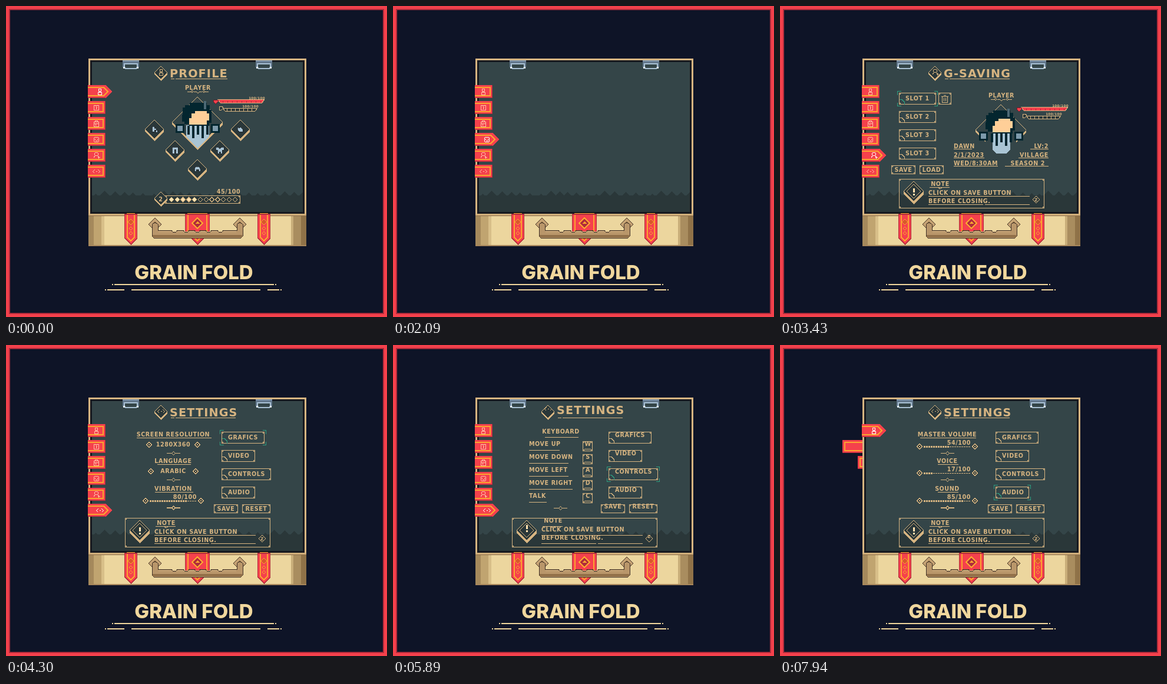
These frames come from a looping animation (647x527 px, 8000 ms). An HTML page:

```html
<!DOCTYPE html>
<html lang="en">
<head>
<meta charset="utf-8">
<title>Game menu in a case</title>
<style>
html, body { margin: 0; width: 100%; height: 100%; overflow: hidden; background: #0e1427; }
svg { display: block; width: 647px; height: 527px; shape-rendering: crispEdges; }
text { font-family: "DejaVu Sans", sans-serif; font-weight: 700; fill: #d6b481; letter-spacing: .06em; }
</style>
</head>
<body>
<svg id="stage" viewBox="0 0 647 527" xmlns="http://www.w3.org/2000/svg"></svg>
<script>
const TAN = '#d6b481', CREAM = '#ffe3b0', PANEL = '#344548', DARK = '#2a3739',
  INK = '#17191f', RED = '#f5414c', WINE = '#b02c3b', GOLD = '#fba530',
  STEEL = '#a9c4d4', BROWN = '#a8763f', TEAL = '#2f9e80', NAVY = '#03262f';

// Drawing helpers
const rect = (x, y, w, h, fill) => `<rect x="${x}" y="${y}" width="${w}" height="${h}" fill="${fill}"/>`;
const path = (d, fill = 'none', stroke = 'none', w = 1) =>
  `<path d="${d}" fill="${fill}" stroke="${stroke}" stroke-width="${w}"/>`;
const line = (x1, x2, y, c = TAN) => rect(x1, y, x2 - x1, 1, c);
const move = (x, y, body) => `<g transform="translate(${x} ${y})">${body}</g>`;
const dia = (x, y, r, fill = 'none', stroke = TAN, w = 1) =>
  path(`M${x - r} ${y}L${x} ${y - r}L${x + r} ${y}L${x} ${y + r}Z`, fill, stroke, w);
const gem = (x, y, r, fill = PANEL, t = 4) =>
  path(`M${x - r} ${y}L${x} ${y + r}L${x + r} ${y}v${t}L${x} ${y + r + t}L${x - r} ${y + t}Z`, TAN) + dia(x, y, r, fill);
const text = (x, y, s, anchor = 'start', size = 9.6) =>
  `<text x="${x}" y="${y + size * .365}" font-size="${size}" text-anchor="${anchor}">${s}</text>`;
const times = (n, f) => Array.from({ length: n }, (_, i) => f(i)).join('');

function frame(x, y, w, h, c = TAN) {
  const dot = (a, b) => rect(a, b, 3, 3, c) + rect(a + 1, b + 1, 1, 1, PANEL);
  return `<rect x="${x + .5}" y="${y + .5}" width="${w - 1}" height="${h - 1}" fill="none" stroke="${c}"/>` +
    dot(x, y) + dot(x + w - 3, y) + dot(x, y + h - 3) + dot(x + w - 3, y + h - 3);
}
// Selection marks around a box
function corners(x, y, w, h) {
  const l = x - 2.5, t = y - 2.5, r = x + w + 2.5, b = y + h + 2.5;
  return path(`M${l} ${t + 6}V${t}h6M${r - 6} ${t}H${r}v6M${r} ${b - 6}V${b}h-6M${l + 6} ${b}H${l}v-6`, 'none', TEAL);
}

// Small symbols centred on 0,0
const tabIcons = [
  'M-2 -5h4v4h-4ZM-1 -1v2M1 -1v2M-3 1h6v4h-6Z',
  'M-4 -4h2l2 1l2 -1h2v8h-8ZM-1 0h2M0 -2v4',
  'M-2 -3v-2h4v2M-4 -3h8v8h-8ZM-4 0h8M-1 0v3',
  'M-3 -4h6l1 1v6l-1 1h-6l-1 -1v-6ZM-2 -2v2M2 -2v2M-2 2h4',
  'M-2 -5h4l1 1v3l-1 1h-4l-1 -1v-3ZM-2 0l-3 4M2 0l2 3M2 3h4M4 1v4',
  'M-3 -3l-3 3l3 3M3 -3l3 3l-3 3M-1 0h2'
];
const items = {
  hat: 'M-5 4V0l2 -4h6l2 4v4h-3V1h-4v3Z',
  shirt: 'M-7 -5h4l3 3l3 -3h4v5h-3v6h-3v-3h-2v3h-3V0h-3Z',
  pants: 'M-5 -5h10V6h-4V-1h-2V6h-4Z',
  glove: 'M-5 -4l3 2l2 -2l4 4v4h-6l-3 -3Z',
  boots: 'M-4 -5h4v3h3v3h-3v3h-4ZM2 1h3v4h-3Z'
};
const item = (name, x, y, fill = STEEL) => move(x, y, path(items[name], fill, INK, .7));
const tabIcon = (i, x, y, c) => move(x + .5, y + .5, path(tabIcons[i], 'none', c));

// Pages: fixed shapes plus lettering that drops into place
const pages = [];
function page(title, icon, build) {
  const p = { fixed: '', drop: '' };
  const put = s => p.fixed += s;
  const say = (...a) => p.drop += text(...a);
  put(gem(263, 113, 11, DARK, 3));
  p.drop += tabIcon(icon, 263, 112, TAN);
  say(278, 114, title, 'start', 19.2);
  const end = 278 + title.length * 14;
  put(line(280, 286, 123) + line(288, end, 123));
  build(put, say, p);
  pages.push(p);
}
function heading(put, say, s, x, y) {
  const half = s.length * 3.8;
  say(x, y, s, 'middle');
  put(line(x - half + 3, x + half, y + 6));
}
function note(put, say, p, head, a, b) {
  put(frame(202, 293, 247, 50) + gem(227, 314, 17, DARK, 5) + dia(227, 314, 12) + dia(435, 328, 6, DARK));
  put(line(254, 288, 307) + path('M268 307l4 3l4 -3', 'none', TAN));
  put(line(252, 424, 322) + line(252, 345, 336) + line(348, 424, 336));
  say(272, 301, head, 'middle');
  say(252, 316, a);
  say(252, 330, b);
  say(435, 328, 'Z', 'middle', 7);
  if (head === 'HAT') put(path('M220 311v3h4v-3M230 311v3h4v-3M221 318l3 3h6l3 -3', 'none', CREAM, 2));
  else p.drop += rect(226, 309, 3, 7, CREAM) + rect(226, 318, 3, 3, CREAM);
}
function button(put, say, s, x, y, w, on) {
  put(frame(x, y, w, 20) + path(`M${x + 1} ${y + 11.5}h4l4 4v4`, 'none', on ? TEAL : TAN));
  if (on) put(corners(x, y, w, 20));
  say(x + 11, y + 9, s);
}
function smallButton(put, say, s, x, w) {
  put(frame(x, 270, w, 15));
  say(x + w / 2, 277, s, 'middle');
}
const divider = y => line(273, 281, y) + dia(284.5, y + .5, 3) + line(288, 296, y);
const knob = (x, y) => dia(x, y, 4.5, DARK) + dia(x, y, 1, TAN);
function slot(x, y) {
  return frame(x, y, 32, 33) + path(`M${x + 1} ${y + 23.5}h3l4 4v5`, 'none', TAN) + rect(x + 3, y + 28, 3, 1, TAN);
}

// The figure covers the lower edge of its diamond when open is set
function portrait(open) {
  let s = open ? path('M282 197l17 17v4l-17 -17ZM368 197l-17 17v4l17 -17Z', TAN) + path('M282 197L325 154L368 197', 'none', TAN)
    : gem(325, 197, 43, PANEL, 4);
  s += path(open ? 'M311 202H341V230L335 237H317L311 230Z' : 'M306 202H345V222L325 241L306 222Z', STEEL);
  s += times(5, i => rect(308 + i * 8, 203, 4, i % 2 ? 21 : 15, NAVY));
  s += path('M300 172h4v-4h8v-4h29v4h5v8h3v22h-4v5h-34v-3h-8v-4h-4Z', NAVY);
  s += path('M311 190h4v-8h6v-4h20v4h4v12h-4v7h-30Z', '#ffcf98');
  s += rect(336, 161, 4, 14, '#4d6975');
  s += rect(288, 200, 15, 15, NAVY) + rect(291, 203, 9, 9, '#7d9aab');
  s += rect(348, 200, 15, 15, NAVY) + rect(351, 203, 9, 9, '#7d9aab');
  s += path('M359 158h80l-4 6h-71Z', RED, TAN) + times(9, i => rect(368 + i * 8, 161, 1, 3, WINE));
  s += path('M352 159h3l1 1l1 -1h3v3l-4 4l-4 -4Z', RED, '#7d1628');
  s += path('M368 173h59l-4 5h-51Z', DARK, TAN) + times(7, i => rect(375 + i * 7, 174, 1, 4, TAN));
  s += path('M362 170h5l2 3l-3 3h-4Z', DARK, TAN);
  return s;
}
const stats = (say, x, y) => {
  say(426 + x, 156 + y, '100/100', 'middle', 5.6);
  say(415 + x, 170 + y, '100/100', 'middle', 5.6);
};
const ornament = (x, y) => line(x - 18, x - 12, y) + dia(x - 10, y, 2) + line(x - 7, x - 3, y) +
  path(`M${x - 3} ${y}l3 3l3 -3`, 'none', TAN) + line(x + 3, x + 7, y) + dia(x + 10, y, 2) + line(x + 12, x + 18, y);

page('PROFILE', 0, (put, say) => {
  say(326, 138, 'PLAYER', 'middle');
  put(ornament(326, 145) + portrait(false));
  stats(say, 0, 0);
  [['boots', 252, 209], ['pants', 287, 244], ['hat', 325, 276], ['shirt', 363, 244], ['glove', 398, 209]]
    .forEach(([n, x, y]) => put(gem(x, y, 16, DARK) + item(n, x, y)));
  put(frame(270, 321, 128, 14) + gem(263, 326, 11, DARK, 3));
  put(times(12, i => dia(281 + i * 9.8, 328, 4, i < 5 ? CREAM : 'none')));
  say(263, 327, '2', 'middle');
  say(378, 314, '45/100', 'middle');
});

page('EQUIPMENT', 1, (put, say, p) => {
  Object.entries({ PANTS: 'pants', SHIRT: 'shirt', HAT: 'hat', GLOVE: 'glove', BOOTS: 'boots' }).forEach(([s, n], i) => {
    const x = 229 + i * 48, on = n === 'hat', half = s.length * 3.5;
    say(x + 1, 143, s, 'middle');
    put(line(x - half, x + half, 149) + path(`M${x - 3} 149l3 3l3 -3`, 'none', TAN));
    put(gem(x, 172, 17, on ? CREAM : PANEL) + item(n, x, 172, on ? CREAM : DARK));
  });
  const kinds = ['hat', 'shirt', 'pants', 'glove', 'boots', 'hat', 'shirt', 'pants', 'glove', 'boots'];
  put(times(12, i => slot(202 + i % 6 * 43, i < 6 ? 204 : 249)));
  kinds.forEach((n, i) => put(item(n, 218 + i % 6 * 43, i < 6 ? 221 : 266, i < 5 ? STEEL : BROWN)));
  put(corners(202, 204, 32, 33));
  note(put, say, p, 'HAT', 'BASIC QUALITY HAT.', 'GOOD FOR BEGINNERS.');
});

page('INVENTORY', 2, (put, say, p) => {
  put(times(18, i => slot(202 + i % 6 * 43, 159 + 45 * Math.floor(i / 6))));
  Object.keys(items).forEach((n, i) => put(item(n, 218 + i * 43, 176, BROWN)));
  put(corners(202, 159, 32, 33) + knob(191, 221) + knob(456, 221));
  heading(put, say, 'ITEMS', 325, 143);
  note(put, say, p, 'NOTE', 'BASIC QUALITY ITEM.', 'GOOD FOR BEGINNERS.');
});

page('SOCIAL', 3, (put, say, p) => {
  ['PLAYER', 'FARMER', 'BAKER', 'MINER', 'FISHER', 'SMITH'].forEach((s, i) => {
    const x = i % 2 ? 341 : 193, y = 138 + 50 * Math.floor(i / 2);
    put(frame(x, y, 135, 42) + gem(x + 24, y + 19, 15, DARK) + tabIcon(3, x + 24, y + 19, TAN));
    put(times(6, k => dia(x + 54 + k * 12, y + 28, 4, k < 5 - i % 3 ? RED : 'none')));
    say(x + 49, y + 13, s);
  });
  note(put, say, p, 'NOTE', 'TALK TO THE VILLAGERS', 'TO MAKE FRIENDS.');
});

const closing = ['NOTE', 'CLICK ON SAVE BUTTON', 'BEFORE CLOSING.'];
page('G-SAVING', 4, (put, say, p) => {
  ['SLOT 1', 'SLOT 2', 'SLOT 3', 'SLOT 3'].forEach((s, i) => button(put, say, s, 202, 147 + i * 31, 63, !i));
  put(frame(269, 147, 22, 20) + path('M274 153.5h12M278 151.5h4M275.5 154v9h9v-9M278.5 156v5M281.5 156v5', 'none', TAN));
  smallButton(put, say, 'SAVE', 189, 41);
  smallButton(put, say, 'LOAD', 237, 41);
  say(376, 151, 'PLAYER', 'middle');
  put(ornament(376, 158) + move(50, 13, portrait(true)));
  stats(say, 50, 13);
  [['DAWN', 'LV:2', 326, 425], ['2/1/2023', 'VILLAGE', 347, 405], ['WED/8:30AM', 'SEASON 2', 370, 382]].forEach(([a, b, l, r], i) => {
    const y = Math.round(237 + i * 14.7);
    say(295, y, a);
    say(i === 2 ? 450 : 456, y, b, 'end');
    put(line(295, l, y + 5) + line(r, 456, y + 5));
  });
  note(put, say, p, ...closing);
});

const modes = ['GRAFICS', 'VIDEO', 'CONTROLS', 'AUDIO'], modeWidths = [73, 57, 84, 57];
function settings(mode, build) {
  page('SETTINGS', 5, (put, say, p) => {
    modes.forEach((s, i) => button(put, say, s, 366, 147 + i * 31, modeWidths[i], i === mode));
    smallButton(put, say, 'SAVE', 353, 41);
    smallButton(put, say, 'RESET', 401, 48);
    put(divider(276));
    note(put, say, p, ...closing);
    build(put, say);
  });
}
function choice(put, say, name, value, y, half) {
  heading(put, say, name, 284, y);
  say(284, y + 17.5, value, 'middle');
  put(knob(284 - half, y + 18) + knob(284 + half, y + 18) + divider(y + 32));
}
function slider(put, say, name, value, y) {
  heading(put, say, name, 284, y);
  say(324, y + 14, value + '/100', 'end');
  put(knob(237, y + 21) + knob(331, y + 21) + divider(y + 32));
  put(times(20, i => i * 5 < value ? rect(244 + i * 4, y + 20, 3, 3, TAN) : rect(244 + i * 4, y + 21, 3, 1, TAN)));
}
settings(0, (put, say) => {
  choice(put, say, 'SCREEN RESOLUTION', '1280X360', 151, 41);
  choice(put, say, 'LANGUAGE', 'ARABIC', 196, 38);
  slider(put, say, 'VIBRATION', 80, 243);
});
settings(1, (put, say) => {
  choice(put, say, 'SCREEN MODE', 'WINDOW', 151, 41);
  slider(put, say, 'BRIGHTNESS', 70, 196);
  slider(put, say, 'CONTRAST', 50, 243);
});
settings(2, (put, say) => {
  heading(put, say, 'KEYBOARD', 285, 150);
  ['MOVE UP', 'MOVE DOWN', 'MOVE LEFT', 'MOVE RIGHT', 'TALK'].forEach((s, i) => {
    const y = 171 + i * 22;
    say(231, y, s);
    say(331, y, 'WSADC'[i], 'middle');
    put(line(231, 231 + s.length * 7.4, y + 7) + frame(322, y - 8, 17, 17) + line(325, 336, y + 5));
  });
});
settings(3, (put, say) => {
  slider(put, say, 'MASTER VOLUME', 54, 151);
  slider(put, say, 'VOICE', 17, 196);
  slider(put, say, 'SOUND', 85, 243);
});

// Case
function ribbon(x, half) {
  const shape = (h, tip) => `M${x - h} 352V${tip - h}L${x} ${tip}L${x + h} ${tip - h}V352Z`;
  return path(shape(half, 405), WINE) + path(shape(half - 1, 403), RED) +
    path(shape(half - 5, 398), 'none', GOLD, 2) + rect(x - half, 352, half * 2, 2, WINE);
}
function clip(x) {
  return rect(x, 92, 28, 12, '#62778c') + rect(x, 92, 28, 2, '#8499ad') +
    path(`M${x + 3} 98h22v6l-2 2h-18l-2 -2Z`, PANEL, '#a8c0d3', 2) + rect(x + 1, 103, 3, 3, '#e6f3fa') + rect(x + 24, 103, 3, 3, '#e6f3fa');
}
function lid() {
  let hills = 'M146 349V321';
  for (let x = 146, i = 0; x < 504; i++) {
    const w = 12 + i * 7 % 9, h = 3 + i * 5 % 6;
    hills += `L${x + w / 2 - h} 321L${x + w / 2} ${321 - h}L${x + w / 2 + h} 321L${x + w} 321`;
    x += w;
  }
  return rect(140, 89, 370, 266, TAN) + rect(143, 92, 364, 260, INK) + rect(146, 95, 358, 254, PANEL) +
    `<svg x="146" y="300" width="358" height="49" viewBox="146 300 358 49">${path(hills + 'V349Z', DARK)}</svg>` +
    clip(198) + clip(424);
}
function base() {
  const side = (x, w, c) => rect(x, 356, w, 49, c);
  let s = rect(140, 352, 370, 55, '#a8875c') + rect(140, 352, 370, 3, '#d1af7b') + rect(140, 355, 370, 1, '#8d6e4a') + rect(140, 356, 370, 49, '#ecd69e');
  s += side(140, 9, '#a5895c') + side(149, 13, '#c0a470') + side(162, 5, '#d8bf89');
  s += side(484, 4, '#c9ae79') + side(488, 13, '#a98d5f') + side(501, 9, '#8f7248');
  s += ribbon(212, 11) + ribbon(438, 11) + ribbon(325, 21);
  [212, 438].forEach(x => s += dia(x, 366, 5, '#d9562d', GOLD) + dia(x, 377, 3, RED, GOLD) + dia(x, 385, 3, RED, GOLD));
  s += dia(325, 368, 9, WINE, GOLD, 2) + path('M321 369l4 -4l4 4Z', GOLD);
  [253, 397].forEach(x => s += dia(x, 370, 11, '#c4a173', '#4a3829') + dia(x, 370, 6, '#8c6c47'));
  let top = 'M248 370q5 -5 10 0V380H282';
  [286, 306, 325, 344, 364].forEach(x => top += `H${x - 5}l2 3h6l2 -3`);
  s += path(top + 'H392V370q5 -5 10 0V390l-3 3H251l-3 -3Z', '#b9966a', '#3f3026');
  return s + rect(249, 388, 152, 4, '#916f48') + rect(259, 382, 132, 1, '#d0b082');
}

// Tabs
function tab(i, on) {
  const y = 145 + i * 27;
  const body = on ? `M139 ${y - 11}h30l11 11l-11 11h-30Z` : `M139 ${y - 11}h30v22h-30Z`;
  const trim = on ? `M139 ${y - 7}h27l7 7l-7 7h-27` : `M139 ${y - 7}h26v14h-26`;
  return path(body, RED) + rect(139, y + 10, 30, 1, WINE) + (on ? '' : rect(168, y - 11, 1, 22, WINE)) +
    path(trim, 'none', GOLD, 2) + tabIcon(i, on ? 159 : 153, y, on ? '#fff' : '#ffc0a8');
}
const backTab = i => rect(0, 134 + i * 27, 45, 22, RED) + rect(0, 155 + i * 27, 45, 1, WINE) +
  path(`M45 ${138 + i * 27}H4v14H45`, 'none', GOLD, 2);

function bottomTitle() {
  const c = '#f0d79d';
  return `<text x="319" y="463" font-size="33" text-anchor="middle" style="font-family:Inter,sans-serif;font-weight:800;letter-spacing:0;fill:${c}">GRAIN FOLD</text>` +
    rect(184, 471, 271, 2, c) + rect(180, 471, 2, 2, c) + rect(457, 471, 2, 2, c) +
    rect(213, 480, 219, 2, c) + rect(172, 480, 29, 2, c) + rect(444, 480, 20, 2, c) + rect(168, 480, 2, 2, c) + rect(466, 480, 2, 2, c);
}

const stage = document.getElementById('stage');
stage.innerHTML = rect(0, 0, 647, 527, RED) + rect(5, 5, 637, 517, WINE) + rect(7, 7, 633, 513, '#0e1427') +
  times(6, i => `<g class="back">${backTab(i)}</g>`) + lid() + base() +
  pages.map(p => `<g class="page">${p.fixed}<g class="drop">${p.drop}</g></g>`).join('') +
  times(6, i => `<g class="tab">${tab(i, false)}</g><g class="picked">${tab(i, true)}</g>`) + bottomTitle();

const all = c => [...stage.querySelectorAll('.' + c)];
const pageEls = all('page'), drops = all('drop'), tabs = all('tab'), picked = all('picked'), backs = all('back');
const show = (el, on) => el.style.display = on ? '' : 'none';
const shift = (el, x, y) => el.setAttribute('transform', `translate(${x} ${y})`);

const LOOP = 8000, FIRST = 350, PERIOD = 870, BLANK = 200;
const DESELECT = 6940, RETRACT = 7340;

function update(t) {
  const n = t < FIRST ? 0 : Math.min(8, Math.floor((t - FIRST) / PERIOD) + 1);
  const since = n ? t - FIRST - (n - 1) * PERIOD - BLANK : LOOP;
  const step = Math.min(9, Math.floor(since / 30));
  pageEls.forEach((el, i) => show(el, i === n && since >= 0));
  if (since >= 0) shift(drops[n], 0, -Math.round(21 * (1 - step / 9) ** 3));

  const current = t < DESELECT ? Math.min(n, 5) : -1;
  const wave = t < RETRACT ? -1 : Math.floor((t - RETRACT) / 100) * 5 / 6;
  for (let i = 0; i < 6; i++) {
    // Each tab pops, slides off the left edge, then tucks behind the case
    const k = wave < 0 ? -1 : wave - (5 - i) + 1e-6;
    const popped = k >= 0 && k < 1;
    show(tabs[i], k < 0 && i !== current);
    show(picked[i], popped || k < 0 && i === current);
    shift(picked[i], popped ? -Math.round(33 * k) : 0, 0);
    show(backs[i], k >= 1 && k < 3);
    shift(backs[i], Math.round(k < 2 ? 106 + 26 * (k - 1) : 132 + 8 * (k - 2)), 0);
  }
}

const start = performance.now();
function tick() {
  update((performance.now() - start) % LOOP);
  requestAnimationFrame(tick);
}
update(0);
requestAnimationFrame(tick);
</script>
</body>
</html>
```
